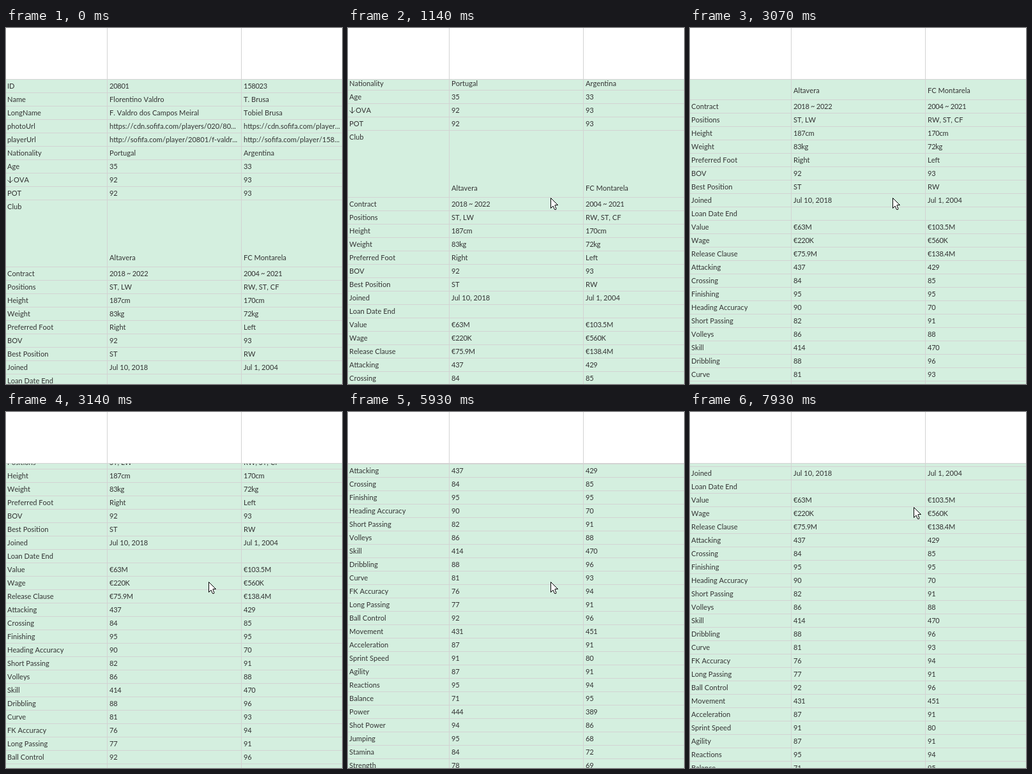
An HTML page with a canvas that plays this animation: 526x558 px, repeating every 7.99 s.

```html
<!DOCTYPE html>
<html lang="en">
<head>
<meta charset="utf-8">
<title>Player comparison</title>
<style>
html, body { margin: 0; width: 100%; height: 100%; overflow: hidden; background: #fff; }
canvas { display: block; }
</style>
</head>
<body>
<canvas id="stage" width="526" height="558"></canvas>
<script>
const W = 526, H = 558, LOOP = 7990;
const HEAD = 80, ROW = 21, CLUB = 105;
const COLS = [0, 159, 369];
const GREEN = '#d4efdf', GRID = '#d3d3d3', INK = '#333';

const rows = `ID|20801|158023
Name|Florentino Valdro|T. Brusa
LongName|F. Valdro dos Campos Meiral|Tobiel Brusa
photoUrl|https://cdn.sofifa.com/players/020/80...|https://cdn.sofifa.com/player...
playerUrl|http://sofifa.com/player/20801/f-valdr...|http://sofifa.com/player/158...
Nationality|Portugal|Argentina
Age|35|33
OVA|92|93
POT|92|93
Club|Altavera|FC Montarela
Contract|2018 ~ 2022|2004 ~ 2021
Positions|ST, LW|RW, ST, CF
Height|187cm|170cm
Weight|83kg|72kg
Preferred Foot|Right|Left
BOV|92|93
Best Position|ST|RW
Joined|Jul 10, 2018|Jul 1, 2004
Loan Date End||
Value|€63M|€103.5M
Wage|€220K|€560K
Release Clause|€75.9M|€138.4M
Attacking|437|429
Crossing|84|85
Finishing|95|95
Heading Accuracy|90|70
Short Passing|82|91
Volleys|86|88
Skill|414|470
Dribbling|88|96
Curve|81|93
FK Accuracy|76|94
Long Passing|77|91
Ball Control|92|96
Movement|431|451
Acceleration|87|91
Sprint Speed|91|80
Agility|87|91
Reactions|95|94
Balance|71|95
Power|444|389
Shot Power|94|86
Jumping|95|68
Stamina|84|72
Strength|78|69`.split('\n').map(line => line.split('|'));

// [time, scroll offset]; each wheel notch is 109 px
const scrolls = [
  [0, 0], [1070, 44], [1140, 109], [2140, 153], [2210, 218], [3070, 262],
  [3140, 327], [4880, 393], [4940, 436], [5930, 545], [6530, 436]
];

// Pointer glides: the screen refreshes it every `step` ms
const REST = [317, 266];
const linear = u => u;
const smooth = u => u * u * (3 - 2 * u);
const easeOut = u => 1 - (1 - u) ** 2;
const glides = [
  { at: 330, step: 78, from: [477, 545], to: REST, n: 6, ease: easeOut },
  { at: 6734, step: 66, from: REST, to: [159, 146], n: 6, ease: smooth },
  { at: 7130, step: 66, from: [159, 146], to: [378, 142], n: 7, lift: 7, ease: smooth },
  { at: 7660, step: 130, from: [382, 142], to: [387, 140], n: 1, ease: linear },
  { at: 7930, step: 60, from: [350, 149], to: [350, 149], n: 1, ease: linear }
];

const ctx = document.getElementById('stage').getContext('2d');
const latest = (list, test) => list.filter(test).pop();

function pointerAt(t) {
  const g = latest(glides, g => t >= g.at);
  if (!g) return null;
  const u = Math.min(Math.floor((t - g.at) / g.step), g.n) / g.n;
  const e = g.ease(u);
  const [x, y] = g.from.map((a, i) => a + (g.to[i] - a) * e);
  return [Math.round(x), Math.round(y - (g.lift || 0) * Math.sin(Math.PI * u))];
}

function fill(color, x, y, w, h) {
  ctx.fillStyle = color;
  ctx.fillRect(x, y, w, h);
}

function drawSortArrow(x, y) {
  ctx.strokeStyle = INK;
  ctx.lineWidth = 1;
  ctx.beginPath();
  ctx.moveTo(x + 4.5, y - 9);
  ctx.lineTo(x + 4.5, y + 0.5);
  ctx.moveTo(x + 0.5, y - 3.5);
  ctx.lineTo(x + 4.5, y + 0.5);
  ctx.lineTo(x + 8.5, y - 3.5);
  ctx.stroke();
}

function drawCell(text, col, base) {
  let x = COLS[col] + (col ? 3 : 2);
  if (text === 'OVA') {
    drawSortArrow(x, base);
    x += 10;
  }
  // Figures are set slightly tighter than words
  ctx.letterSpacing = /^[€\d]/.test(text) ? '-0.3px' : '0px';
  ctx.fillStyle = INK;
  ctx.fillText(text, x, base);
}

function drawTable(offset) {
  fill(GREEN, 0, HEAD + 1, W, H - HEAD);
  ctx.save();
  ctx.beginPath();
  ctx.rect(0, HEAD + 1, W, H - HEAD);
  ctx.clip();
  ctx.font = '11.1px Lato, sans-serif';
  ctx.fontKerning = 'none';
  let top = HEAD - offset;
  for (const cells of rows) {
    const tall = cells[0] === 'Club';
    const height = tall ? CLUB : ROW;
    if (top + height > HEAD && top < H) {
      cells.forEach((text, col) =>
        drawCell(text, col, top + (tall && col ? height - 10 : 15)));
      fill(GRID, 0, top + height, W, 1);
    }
    top += height;
  }
  ctx.restore();
  fill(GRID, 0, HEAD, W, 1);
  fill(GRID, COLS[1] - 1, 0, 1, H);
  fill(GRID, COLS[2] - 1, 0, 1, H);
}

function drawPointer([x, y]) {
  const arrow = [[0, 0], [0, 16], [3.5, 12.5], [6, 18], [8, 18], [8.5, 17], [6.5, 12], [6.5, 11], [11, 11]];
  ctx.beginPath();
  arrow.forEach(([dx, dy]) => ctx.lineTo(x + dx + 0.5, y + dy + 0.5));
  ctx.closePath();
  ctx.fillStyle = '#fff';
  ctx.fill();
  ctx.strokeStyle = '#000';
  ctx.lineWidth = 1;
  ctx.lineJoin = 'round';
  ctx.stroke();
}

const start = performance.now();

function draw() {
  const t = (performance.now() - start) % LOOP;
  fill('#fff', 0, 0, W, H);
  drawTable(latest(scrolls, s => t >= s[0])[1]);
  const pointer = pointerAt(t);
  if (pointer) drawPointer(pointer);
  requestAnimationFrame(draw);
}

draw();
</script>
</body>
</html>
```
